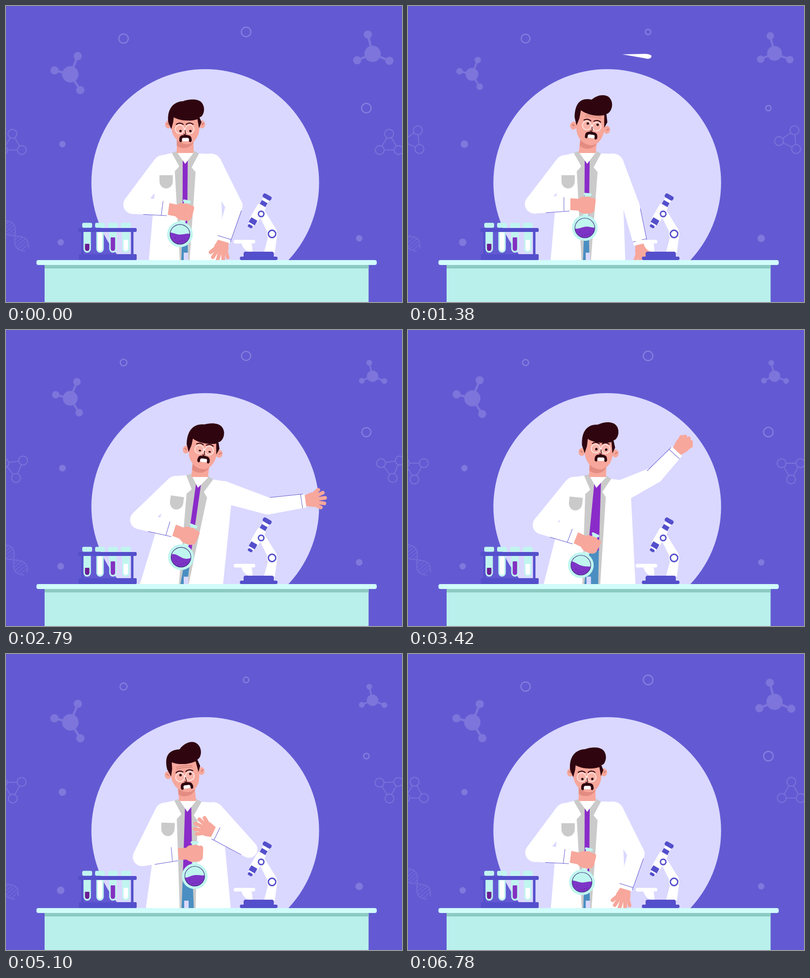
Recreate the animation shown at these times as an HTML page with a canvas. Size 800 by 600 pixels, loop 6810 ms.

```html
<!DOCTYPE html>
<html lang="en">
<head>
<meta charset="utf-8">
<title>Scientist at the lab desk</title>
<style>
html, body { margin: 0; width: 100%; height: 100%; overflow: hidden; background: #635ad3; }
canvas { display: block; }
</style>
</head>
<body>
<canvas id="stage" width="800" height="600"></canvas>
<script>
const g = document.getElementById('stage').getContext('2d');
const LOOP = 6810, TIMES = [0, 1380, 2790, 4020, 5100, 5940];
const BG = '#635ad3', LILAC = '#dad8ff', WHITE = '#fff', GREY = '#cacaca', SKIN = '#f7a79b',
  SHADE = '#e48c82', HAIR = '#2f0510', PURPLE = '#8a2bc9', BLUE = '#4a8ec2', MINT = '#c0f5ef',
  INDIGO = '#544fcb', FAINT = '#7d75db', LIQUID = '#7d35c6';

// ---- motion ----
// Smooth periodic curve through one point per key time.
function track(...keys) {
  const n = keys.length;
  const time = i => TIMES[(i + n) % n] + LOOP * Math.floor(i / n);
  const key = i => keys[(i + n) % n];
  return t => {
    let i = n - 1;
    while (TIMES[i] > t) i--;
    const a = time(i), d = time(i + 1) - a, u = (t - a) / d, v = 1 - u;
    const out = key(i).map((p, c) => {
      const q = key(i + 1)[c];
      const m = .5 * d * (q - key(i - 1)[c]) / (time(i + 1) - time(i - 1));
      const w = .5 * d * (key(i + 2)[c] - p) / (time(i + 2) - a);
      return v * v * (1 + 2 * u) * p + u * v * v * m + u * u * (3 - 2 * u) * q - u * u * v * w;
    });
    return out;
  };
}
// A soft pulse around one moment, wrapping with the loop.
function bump(t, when, width) {
  const d = Math.abs(t - when), near = Math.min(d, LOOP - d);
  return Math.exp(-((near / width) ** 2));
}
const wave = (t, turns, phase = 0) => Math.cos(2 * Math.PI * (turns * t / LOOP + phase));
const clamp = x => Math.max(0, Math.min(1, x));

// ---- geometry and drawing helpers ----
const rad = deg => deg * Math.PI / 180;
const heading = (a, b) => Math.atan2(b[1] - a[1], b[0] - a[0]) * 180 / Math.PI;
function spin([ox, oy], deg, x, y) {
  const c = Math.cos(rad(deg)), s = Math.sin(rad(deg));
  return [ox + x * c - y * s, oy + x * s + y * c];
}
function at([x, y], deg, draw) {
  g.save();
  g.translate(x, y);
  g.rotate(rad(deg));
  draw();
  g.restore();
}
function fill(color, d) { g.fillStyle = color; g.fill(new Path2D(d)); }
function line(color, width, d) {
  g.strokeStyle = color;
  g.lineWidth = width;
  g.lineCap = g.lineJoin = 'round';
  g.stroke(new Path2D(d));
}
const outline = pts => 'M' + pts.join('L') + 'Z';
const poly = (color, ...pts) => fill(color, outline(pts));
function oval(color, x, y, rx, ry = rx) {
  g.fillStyle = color;
  g.beginPath();
  g.ellipse(x, y, rx, ry, 0, 0, 7);
  g.fill();
}
function ring(color, width, x, y, r) {
  g.strokeStyle = color;
  g.lineWidth = width;
  g.beginPath();
  g.arc(x, y, r, 0, 7);
  g.stroke();
}
function box(color, x, y, w, h, r = 0) {
  g.fillStyle = color;
  g.beginPath();
  g.roundRect(x, y, w, h, r);
  g.fill();
}

// ---- backdrop ----
const triTurn = track([-90], [-65], [-38], [-25], [-32], [-58]);

function molecule(x, y, size, nodes) {
  for (const [dx, dy] of nodes) {
    const nx = x + dx * size, ny = y + dy * size;
    line(FAINT, 4.5 * size, `M${x},${y}L${nx},${ny}`);
    oval(FAINT, nx, ny, 8.3 * size);
  }
  oval(FAINT, x, y, 16.5 * size);
}
function triangle(center, turn) {
  const nodes = [0, 120, 240].map(a => spin(center, turn + a, 22, 0));
  line(FAINT, 1.6, outline(nodes));
  for (const [x, y] of nodes) {
    oval(BG, x, y, 9);
    ring(FAINT, 1.8, x, y, 9);
  }
}
function helix() {
  for (let x = -48; x < 36; x += 3) {
    const y = 13 * Math.sin(x / 13), next = 13 * Math.sin((x + 3) / 13);
    line('#756dd9', 1.8, `M${x},${y}L${x + 3},${next}M${x},${-y}L${x + 3},${-next}`);
    if (x % 6 === 0) line('#756dd9', 1.2, `M${x},${-y}V${y}`);
  }
}
function backdrop(t) {
  box(BG, 0, 0, 800, 600);
  const left = 1.01 - .27 * bump(t, 1800, 1000), right = .69 + .37 * bump(t, 500, 1200);
  molecule(126.5 + 3.5 * left, 138.5, left, [[15, -37], [-32, -8], [20, 32]]);
  molecule(740.5, 86 + 11 * right, right, [[-9.5, -39], [-31, 13], [34, 14]]);
  const pulse = wave(t, 2, .06);
  ring('#8880e0', 2.2, 237.5, 66, 7.8 + 1.8 * wave(t, 1, -.06));
  ring('#8880e0', 2.2, 485, 52.5, 7.6 + 2.2 * pulse);
  ring('#8880e0', 2.2, 728, 207, 7.6 + 2.2 * pulse);
  for (const [x, y] of [[114, 280], [110.5, 479], [713.5, 471]]) oval('#8178dd', x, y, 7 - .6 * wave(t, 2));
  const dx = 4.5 * wave(t, 2, .25), dy = 5 * wave(t, 2) - 5;
  for (const x of [13, 774]) triangle([x + dx, 281 + dy], triTurn(t)[0]);
  at([8 + 11 * pulse, 466], 50, helix);
  oval(LILAC, 402.5, 358, 230);
  const fly = (t - 1380) / 130;
  if (Math.abs(fly) < 1) {
    g.globalAlpha = 1 - fly * fly;
    at([fly * 90, fly * 9], 0, () => fill(WHITE, 'M432,98L478,97Q493,98 491,103Q488,109 478,106Z'));
    g.globalAlpha = 1;
  }
}

// ---- scientist: a few key points, the rest follows from them ----
const spine = track([362, 361], [362, 360], [391, 359], [373, 380], [367, 367], [353, 351]); // neck x, hip x
const fistPath = track([355, 416], [355, 403], [365, 415], [363, 445], [375, 404], [355, 386]);
const elbowPath = track([461, 405], [451, 406], [529, 357], [467, 247], [491, 396], [460, 394]);
const wristPath = track([439, 477], [470, 483], [605, 346], [474, 171], [419, 361], [449, 475]);

// Elbow of an arm with two bones of equal length, bent to the left.
function bend(a, b, bone) {
  const dx = b[0] - a[0], dy = b[1] - a[1], d = Math.hypot(dx, dy);
  const h = Math.sqrt(Math.max(0, bone * bone - d * d / 4)) / d;
  return [a[0] + dx / 2 - dy * h, a[1] + dy / 2 + dx * h];
}
function pose(t) {
  const [x, hip] = spine(t), neck = [x, 297], lean = (x - 362) * .28;
  const chest = (px, py) => spin(neck, lean, px, py);
  const shoulderL = chest(-44, 27), shoulderR = chest(52, 24);
  const fist = fistPath(t), elbowL = bend(shoulderL, fist, 100), turn = heading(elbowL, fist);
  const pitch = bump(t, 4020, 700) + .7 * bump(t, 2050, 1000);
  const tilt = 11 * bump(t, 2100, 1100) - 13 * bump(t, 5600, 650);
  const frown = clamp(1.4 * (bump(t, 1380, 600) + bump(t, 5500, 700)));
  return {
    neck, lean, chest, hip, shoulderL, shoulderR, fist, elbowL, turn, pitch, tilt, frown,
    open: bump(t, 4020, 600) + .45 * bump(t, 5600, 650),
    wristL: spin(fist, turn, -26, -1),
    elbowR: elbowPath(t), wristR: wristPath(t),
    head: [x + tilt * .85, 240 + 15 * pitch],
    quiff: clamp(frown + pitch * pitch),
    lids: Math.max(bump(t, 2690, 130), bump(t, 5940, 150)),
  };
}

function segment(a, ra, b, rb) {
  const turn = heading(a, b);
  poly(WHITE, spin(a, turn, 0, ra), spin(a, turn, 0, -ra), spin(b, turn, 0, -rb), spin(b, turn, 0, rb));
  return turn;
}
function arm(shoulder, elbow, wrist, re, side, cuff, seam) {
  const hw = 14;
  oval(WHITE, ...shoulder, 22);
  oval(WHITE, ...elbow, re);
  segment(shoulder, 22, elbow, re);
  const turn = segment(elbow, re, wrist, hw);
  const grow = (re - hw) / Math.hypot(wrist[0] - elbow[0], wrist[1] - elbow[1]);
  at(wrist, turn, () =>
    line('#6860d2', 1, `M${-seam},${side * (hw + grow * seam)}L-3,${side * hw}M${-cuff},${-hw}V${hw}`));
}
function coat({ chest, hip, open, lean, shoulderL, shoulderR, elbowL, wristL, elbowR, wristR }) {
  const [lx, ly] = shoulderL, [rx, ry] = shoulderR;
  poly(WHITE, chest(-27, 1), [lx - 4, ly - 21], [lx - 13, ly], [hip - 72 - 34 * open - 2 * lean, 516],
    [hip + 79 + 28 * open, 516], [rx + 18, ry + 4], [rx + 5, ry - 21], chest(28, 2));
  arm(shoulderL, elbowL, wristL, 19, 1, 14, 50);
  arm(shoulderR, elbowR, wristR, 17, -1, 8, 70);
}
function outfit({ neck, lean, chest, hip, open }) {
  const lining = 9.5 + 23 * open, leg = 6.5 + 20.5 * open, waist = 4.5 + 18 * open;
  const mid = hip + (neck[0] - hip) / 3, crotch = 359 + 12 * open * open;
  poly(GREY, chest(-27, 1), chest(-15, -4), chest(17, -4), chest(28, 2), chest(13, 30), chest(21, 40),
    [hip + lining, 516], [hip - lining, 516], chest(-21, 38), chest(-12, 28));
  poly(PURPLE, chest(-5, 16), chest(5 + 9 * open, 16 - 10 * open), [mid + waist, 448], [mid - waist, 448]);
  poly(BLUE, [mid - waist, 447], [mid + waist, 447], [hip + leg, 516], [hip - leg, 516]);
  box(LILAC, crotch, 500, 9, 16);
  poly(WHITE, chest(-17, -1), chest(18, -1), chest(0, 23));
  at(neck, lean, () => fill(GREY, 'M-52,46h27v12a13.5,15 0 0 1 -27,0Z'));
}
function openHand({ elbowR, wristR }) {
  const open = clamp((wristR[1] - 180) / 100);
  at(wristR, heading(elbowR, wristR), () => {
    fill(SKIN, 'M0,-11L14,-15Q24,-12 24,0Q24,12 14,15L0,11Z');
    if (open < 1) box(SKIN, 8, -14 - 4 * (1 - open), 27, 28 + 8 * (1 - open), 8);
    for (let i = -2; i <= 2; i++) {
      const [x, y] = spin([10, 0], i * (14 + 8 * open), 17 + 13 * open - i * i, 0);
      line(SKIN, 7.5, `M13,${4 * i}L${x},${y}`);
    }
  });
}
function flask({ fist, turn }, t) {
  const bulb = spin(fist, turn - 3.5, 0, 47), tilt = turn + 4, slosh = .3 * (tilt - 8);
  at(bulb, tilt, () => {
    box(MINT, -5.5, -68, 11, 48);
    box('#d8fdfa', -2, -60, 4, 36, 2);
    box(MINT, -8, -71, 16, 5, 2);
    oval(MINT, 0, 0, 26);
  });
  at(bulb, 0, () => {
    let d = 'M-22,22';
    for (let x = -22; x <= 22; x += 2) {
      d += `L${x},${slosh * Math.sin(x / 12) - 1 - 1.5 * Math.sin(x / 6 + 5 + t * 4 * Math.PI / LOOP)}`;
    }
    g.beginPath();
    g.arc(0, 0, 20, 0, 7);
    g.clip();
    fill(LIQUID, d + 'L22,22Z');
    for (let i = 0; i < 5; i++) oval('#5c209c', 5 * i - 10, 8 + i * 7 % 8, 1);
  });
  ring('#3c2a78', 1.1, ...bulb, 20);
}
function grip({ fist, turn }) {
  at(fist, turn, () => fill(SKIN,
    'M-27,-13L-10,-12Q-5,-18 3,-16Q10,-19 16,-14Q25,-16 24,-7L22,10Q20,18 8,18Q-4,19 -11,12L-27,11Z'));
}
function face({ lids, quiff, frown }) {
  const look = 4 - 8 * quiff;
  for (const x of [-10, 10]) {
    oval('#f9b3a8', x, 0, 9);
    if (lids < .8) oval(HAIR, x + 1.5, look, 2.5, 2.5 * (1 - .6 * lids));
    else line(HAIR, 1.2, `M${x - 4},2q4,-2 8,0`);
    ring('#fff0ee', 1.5, x, 0, 9);
    line(HAIR, 2, `M${x - 7},-10q7,-5 14,0`);
  }
  line('#fff0ee', 1.5, 'M-1.5,-1h3');
  line(HAIR, 1.3, 'M1,2L2,9Q1,11 -2,10');
  fill(HAIR, 'M-11,24Q-12,12 -3,12Q1,10 5,12Q15,12 14,24Q11,28 9,25L8,19H-5L-6,25Q-8,28 -11,24Z');
  box(WHITE, -5.5, 17.5, 14, 7, 3);
  g.globalAlpha = frown;
  for (const y of [-17, -20.5]) line('#c87c74', 1.2, `M-15,${y}Q0,${y - 3} 17,${y}`);
  g.globalAlpha = 1;
}
function drawHead(p) {
  const { neck: [nx, ny], head, tilt, pitch, frown, quiff } = p;
  const chin = 40 - 11 * pitch, jaw = chin - 34;
  const throat = outline([spin(head, tilt, -17, 15), spin(head, tilt, 17, 15), [nx + 17, ny + 1], [nx - 17, ny + 1]]);
  fill(SKIN, throat);
  g.save();
  g.clip(new Path2D(throat));
  at(head, tilt, () => oval(SHADE, -3, chin - 10, 21, 18));
  g.restore();
  at(head, tilt, () => {
    const r = -22 * pitch - 9 * frown, burn = 10 + r * .6;
    for (const x of [-34, 34]) oval(SKIN, x, 0, 6.5, 8);
    line('#a85a58', 1, 'M-37,-2q3,0 4,3M38,-2q-3,0 -4,3');
    fill(SKIN, `M-28,${-20 + r}H29V${jaw}C28,${chin - 13} 17,${chin} 4,${chin}C-12,${chin} -27,${chin - 14} -28,${jaw}Z`);
    at([8 * pitch - 1, 10 - 31 * pitch], 0, () => face(p));
    fill(HAIR, `M-28,${burn}L-34,${-4 + r * .7}C-37,${-28 + r} -26,${-46 + r + 6 * quiff} -4,${-47 + r + 9 * quiff}
      C6,${-50 + r} 26,${-53 + r - 2 * quiff} 34,${-43 + r}C43,${-31 + r} 36,${-14 + r} 29,${-14 + r + quiff}
      L33,${-4 + r * .6}L28,${burn - 2}L25,${-10 + r}C10,${-5 + r} -12,${-7 + r} -23,${-14 + r}L-24,${-5 + r * .6}Z`);
  });
}

// ---- desk and equipment ----
function microscope() {
  fill(WHITE, 'M509,420L522,414L546,453Q549,462 547,470L543,500H521L529,470L527,456Z');
  fill(WHITE, 'M475,479Q480,499 498,499L497,484Q494,480 494,478Z');
  box(WHITE, 460, 474, 43.5, 7.5, 3.5);
  at([512.8, 412.7], 30, () => {
    box(WHITE, -9, -10, 18, 36, 3);
    box(WHITE, -6, -28, 13, 20);
    box(INDIGO, -9.5, -34, 19, 9, 4);
    box(INDIGO, -6, -19, 13, 9);
    box(INDIGO, -7, 22, 14, 11);
    box(WHITE, -6, 33, 12, 3);
    box(INDIGO, -5, 36, 10, 6, 3);
  });
  for (const [x, y, r] of [[515.5, 421.5, 5.5], [537.5, 462, 7.5]]) {
    oval(WHITE, x, y, r + 3);
    ring(INDIGO, 2.8, x, y, r);
  }
  box(INDIGO, 480, 498, 61, 14, 4);
  box(INDIGO, 472.5, 508, 76, 7, 3);
}
function rack() {
  for (const x of [152, 252.5]) box(INDIGO, x, 455, 5, 52);
  box(INDIGO, 146, 450, 118, 8, 2.5);
  box(INDIGO, 147, 503, 117, 12, 2);
  const tubes = [[482, '#6b1d93'], [459, WHITE], [469, '#8430c2'], [474, WHITE]];
  tubes.forEach(([top, color], i) => {
    const x = 164 + i * 26;
    box(MINT, x - 10, 439.5, 20, 10, 3);
    box(MINT, x - 7.5, 458, 15, 42, [0, 0, 7.5, 7.5]);
    box(color, x - 4.5, top, 9, 496.5 - top, [1, 1, 4.5, 4.5]);
  });
}
function desk() {
  box('#b9f0ec', 78, 525, 654.5, 75);
  box('#8ccbc2', 78, 525, 654.5, 7);
  box('#d0fcfa', 61.5, 515, 687.5, 10, 4);
}

const start = performance.now();
function frame() {
  const t = (performance.now() - start) % LOOP, p = pose(t);
  backdrop(t);
  coat(p);
  outfit(p);
  drawHead(p);
  flask(p, t);
  grip(p);
  openHand(p);
  microscope();
  rack();
  desk();
  requestAnimationFrame(frame);
}
frame();
</script>
</body>
</html>
```
